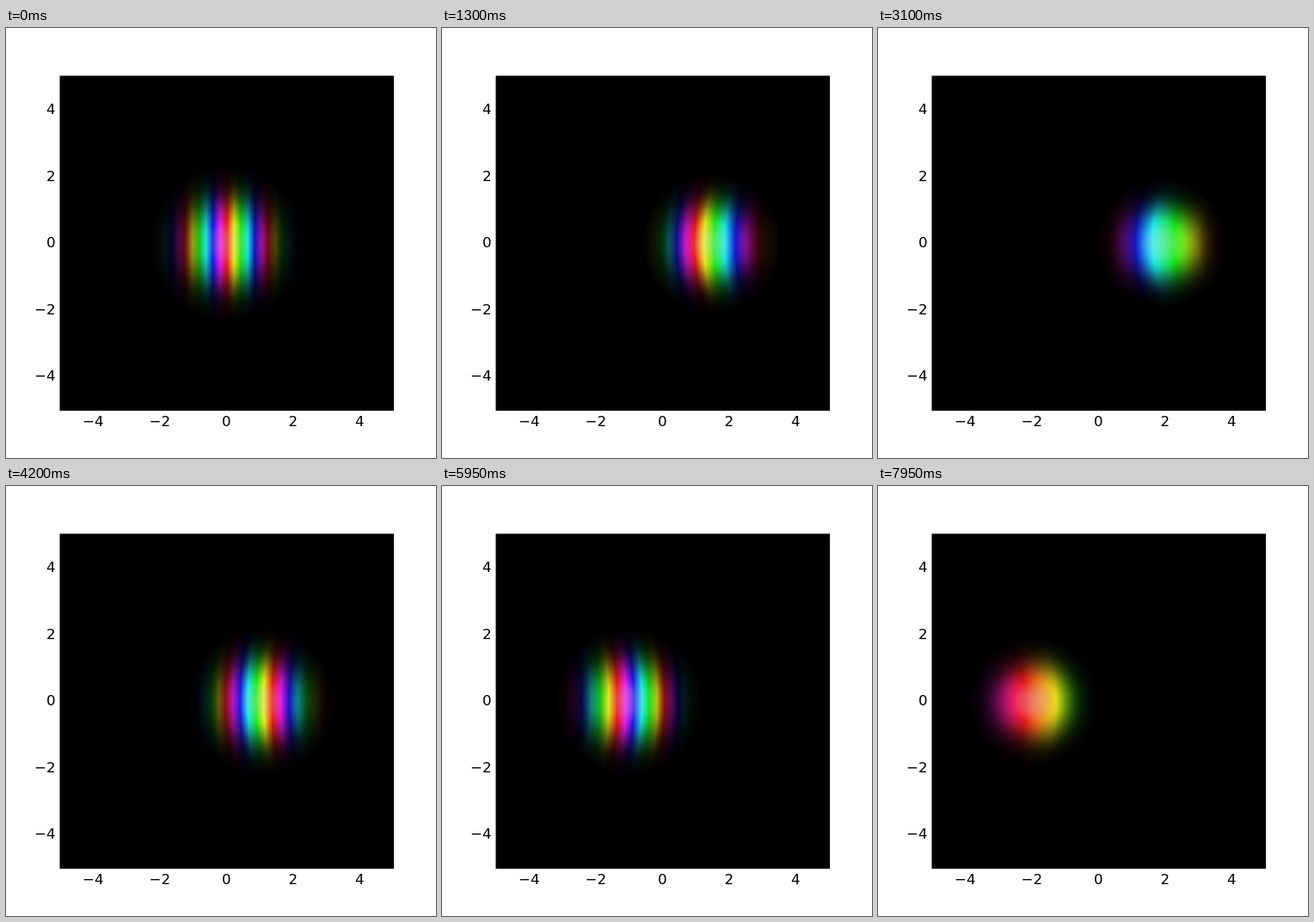
Animation, 500 px wide and 500 px high, one loop 8000 ms. Source, as an HTML page with a canvas:

```html
<!DOCTYPE html>
<html lang="en">
<head>
<meta charset="utf-8">
<title>Oscillating wave packet</title>
<style>
  html, body { margin: 0; width: 100%; height: 100%; overflow: hidden; background: #fff; }
  canvas { display: block; }
</style>
</head>
<body>
<canvas id="stage" width="500" height="500"></canvas>
<script>
const ctx = document.getElementById('stage').getContext('2d');

const STEP_MS = 50, STEPS = 160, PHASE_PER_STEP = 0.031;
const LEFT = 63, TOP = 56, WIDTH = 388, HEIGHT = 389, SCALE = 38.8;

// Gaussian packet in an isotropic harmonic well (hbar = m = 1)
const OMEGA = 2.5, KICK = 5, WIDTH0 = 2;
const PEAK = 1.5, SATURATION = 0.8;

function drawAxes() {
  ctx.fillStyle = '#fff';
  ctx.fillRect(0, 0, 500, 500);
  ctx.fillStyle = '#000';
  ctx.fillRect(LEFT - 0.5, TOP - 0.5, WIDTH + 0.5, HEIGHT + 0.5);
  ctx.font = '16.67px "DejaVu Sans", sans-serif';
  for (let v = -4; v <= 4; v += 2) {
    const label = String(v).replace('-', '\u2212');
    ctx.textAlign = 'center';
    ctx.fillText(label, 256.25 + v * 38.75, 463);
    ctx.textAlign = 'right';
    ctx.fillText(label, 57.5, 255 - v * 38.75);
  }
}

const image = ctx.createImageData(WIDTH, HEIGHT);

function setColor(offset, angle, light) {
  const hue = angle * 6 / Math.PI;
  const chroma = SATURATION * Math.min(light, 1 - light);
  [0, 8, 4].forEach((shift, channel) => {
    const k = (((shift + hue) % 12) + 12) % 12;
    const level = light - chroma * Math.max(-1, Math.min(k - 3, 9 - k, 1));
    image.data[offset + channel] = 255 * level;
  });
}

function drawPacket(step) {
  const phi = step * PHASE_PER_STEP;
  const c = Math.cos(phi), s = Math.sin(phi);
  const center = KICK / OMEGA * s, momentum = KICK * c;

  // Complex width (re + i im) of exp(-(re + i im) r^2 / 2)
  const norm = (OMEGA * c) ** 2 + (WIDTH0 * s) ** 2;
  const re = OMEGA ** 3 * WIDTH0 / norm / OMEGA * OMEGA ** 0;
  const im = OMEGA * (OMEGA ** 2 - WIDTH0 ** 2) * s * c / norm;
  const peak = PEAK * Math.sqrt(re / WIDTH0);
  const basePhase = momentum * center / 2 - Math.atan2(WIDTH0 * s, OMEGA * c);

  for (let j = 0, offset = 0; j < HEIGHT; j++) {
    const y = (j + 0.5 - HEIGHT / 2) / SCALE;
    for (let i = 0; i < WIDTH; i++, offset += 4) {
      const dx = (i + 0.5 - WIDTH / 2) / SCALE - center;
      const r2 = dx * dx + y * y;
      const size = peak * Math.exp(-re * r2 / 2);
      image.data[offset + 3] = 255;
      if (size < 0.01) image.data.fill(0, offset, offset + 3);
      else setColor(offset, basePhase + momentum * dx - im * r2 / 2, size / (1 + size));
    }
  }
  ctx.putImageData(image, LEFT, TOP);
}

let shown = -1;
function tick() {
  const step = Math.floor(performance.now() / STEP_MS) % STEPS;
  if (step !== shown) drawPacket(shown = step);
  requestAnimationFrame(tick);
}

drawAxes();
tick();
</script>
</body>
</html>
```
